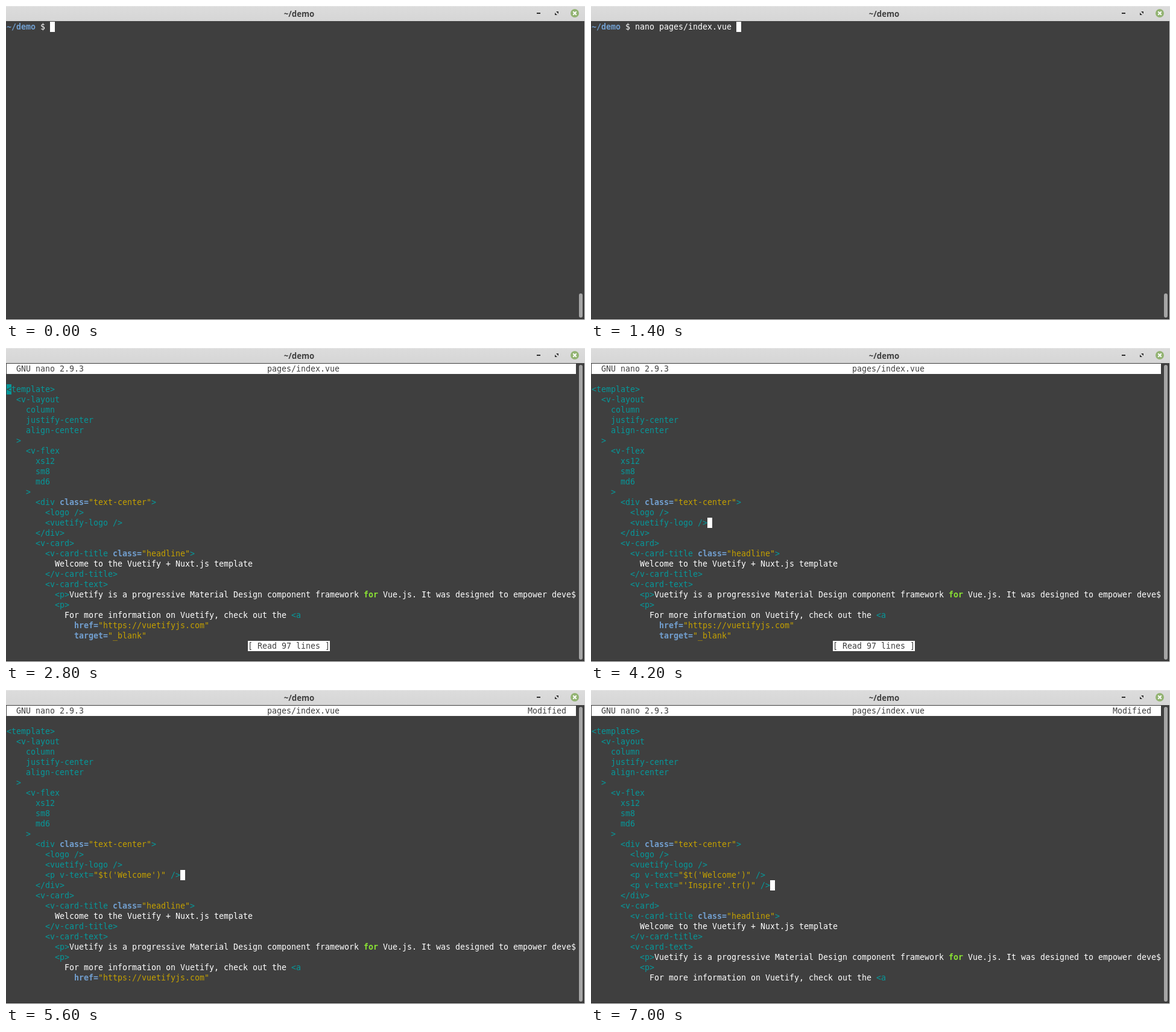
Recreate the animation shown at these times as an HTML page with a canvas. Size 960 px wide and 520 px high, loop 8000 ms.

```html
<!DOCTYPE html>
<html lang="en">
<head>
<meta charset="utf-8">
<title>~/demo</title>
<style>
html, body { margin: 0; width: 960px; height: 520px; overflow: hidden; background: #3f3f3f; }
canvas { display: block; }
</style>
</head>
<body>
<canvas id="stage" width="960" height="520"></canvas>
<script>
const ctx = document.getElementById('stage').getContext('2d');
const BG = '#3f3f3f', WHITE = '#fff', TEAL = '#06989a', BLUE = '#729fcf', YELLOW = '#c4a000', GREEN = '#8ae234';
const CELL_W = 8, CELL_H = 17, LEFT = 1, TOP = 26, PAGE_ROWS = 25;
const LOOP = 8000, STEP = 1400;

const source = `<template>
  <v-layout
    column
    justify-center
    align-center
  >
    <v-flex
      xs12
      sm8
      md6
    >
      <div class="text-center">
        <logo />
        <vuetify-logo />
      </div>
      <v-card>
        <v-card-title class="headline">
          Welcome to the Vuetify + Nuxt.js template
        </v-card-title>
        <v-card-text>
          <p>Vuetify is a progressive Material Design component framework for Vue.js. It was designed to empower deve$
          <p>
            For more information on Vuetify, check out the <a
              href="https://vuetifyjs.com"
              target="_blank"`.split('\n');
const additions = [
  `        <p v-text="$t('Welcome')" />`,
  `        <p v-text="'Inspire'.tr()" />`
];
const INSERT_AT = 14;

const scenes = [
  { cursor: [0, 9], command: '' },
  { cursor: [0, 30], command: 'nano pages/index.vue' },
  { cursor: [2, 0], added: 0 },
  { cursor: [15, 24], added: 0 },
  { cursor: [16, 36], added: 1 },
  { cursor: [17, 37], added: 2 }
];

function rect(x, y, w, h, color) {
  ctx.fillStyle = color;
  ctx.fillRect(x, y, w, h);
}

function pill(x, y, w, h, color) {
  ctx.fillStyle = color;
  ctx.beginPath();
  ctx.roundRect(x, y, w, h, w / 2);
  ctx.fill();
}

function cells(row, col, count, color) {
  rect(LEFT + col * CELL_W, TOP + row * CELL_H, count * CELL_W, CELL_H, color);
}

function text(row, col, string, color, bold) {
  ctx.font = `${bold ? 'bold ' : ''}13.29px "DejaVu Sans Mono", monospace`;
  ctx.textAlign = 'left';
  ctx.fillStyle = color;
  ctx.fillText(string, LEFT + col * CELL_W, TOP + 13 + row * CELL_H);
}

function drawCode(lines) {
  const token = /"[^"]*"|\b(?:class|href|target)=|\bfor\b|[<>]|[^\s<>"]+/g;
  let inTag = false;
  lines.forEach((line, i) => {
    for (const { 0: word, index } of line.matchAll(token)) {
      if (word === '<') inTag = true;
      const attribute = /^(class|href|target)=$/.test(word);
      const keyword = word === 'for';
      const color = word[0] === '"' ? YELLOW : attribute ? BLUE : keyword ? GREEN : inTag ? TEAL : WHITE;
      text(i + 2, index, word, color, attribute || keyword);
      if (word === '>') inTag = false;
    }
  });
}

function drawWindow() {
  rect(0, 0, 960, 520, BG);
  const bar = ctx.createLinearGradient(0, 0, 0, 25);
  bar.addColorStop(0, '#dcdcdc');
  bar.addColorStop(1, '#d6d6d6');
  rect(0, 0, 960, 25, bar);
  rect(0, 0, 960, 1, '#e6e6e6');
  rect(959, 25, 1, 495, '#d6d6d6');
  rect(0, 519, 960, 1, '#d6d6d6');

  ctx.font = '600 13.3px "Noto Sans", "Open Sans", sans-serif';
  ctx.textAlign = 'center';
  ctx.fillStyle = '#404040';
  ctx.fillText('~/demo', 486, 18);

  rect(880, 11, 6, 2, '#303030');
  ctx.fillStyle = '#303030';
  ctx.fill(new Path2D('M912 9h4v4zM910 11v4h4z'));
  pill(936, 5, 14, 14, '#92b372');
  ctx.strokeStyle = WHITE;
  ctx.lineWidth = 2;
  ctx.stroke(new Path2D('M940.3 9.3l5.4 5.4M945.7 9.3l-5.4 5.4'));
}

function drawShell({ command, cursor }) {
  text(0, 0, '~/demo', BLUE, true);
  text(0, 7, '$', WHITE);
  text(0, 9, command, WHITE);
  cells(...cursor, 1, WHITE);
  pill(950, 476, 6, 40, '#a5a5a5');
}

function drawEditor({ added, cursor }) {
  cells(0, 0, 118, WHITE);
  text(0, 2, 'GNU nano 2.9.3', BG);
  text(0, 54, 'pages/index.vue', BG);
  if (added) {
    text(0, 108, 'Modified', BG);
  } else {
    cells(27, 50, 17, WHITE);
    text(27, 50, '[ Read 97 lines ]', BG);
  }
  const lines = [...source];
  lines.splice(INSERT_AT, 0, ...additions.slice(0, added));
  drawCode(lines.slice(0, PAGE_ROWS));

  const [row, col] = cursor;
  const under = lines[row - 2][col];
  cells(row, col, 1, under ? TEAL : WHITE);
  if (under) text(row, col, under, BG);
  pill(950, 28, 6, 488, '#a5a5a5');
}

function draw(now) {
  const scene = scenes[Math.floor((now % LOOP) / STEP)];
  drawWindow();
  if ('command' in scene) drawShell(scene);
  else drawEditor(scene);
  requestAnimationFrame(draw);
}
requestAnimationFrame(draw);
</script>
</body>
</html>
```
